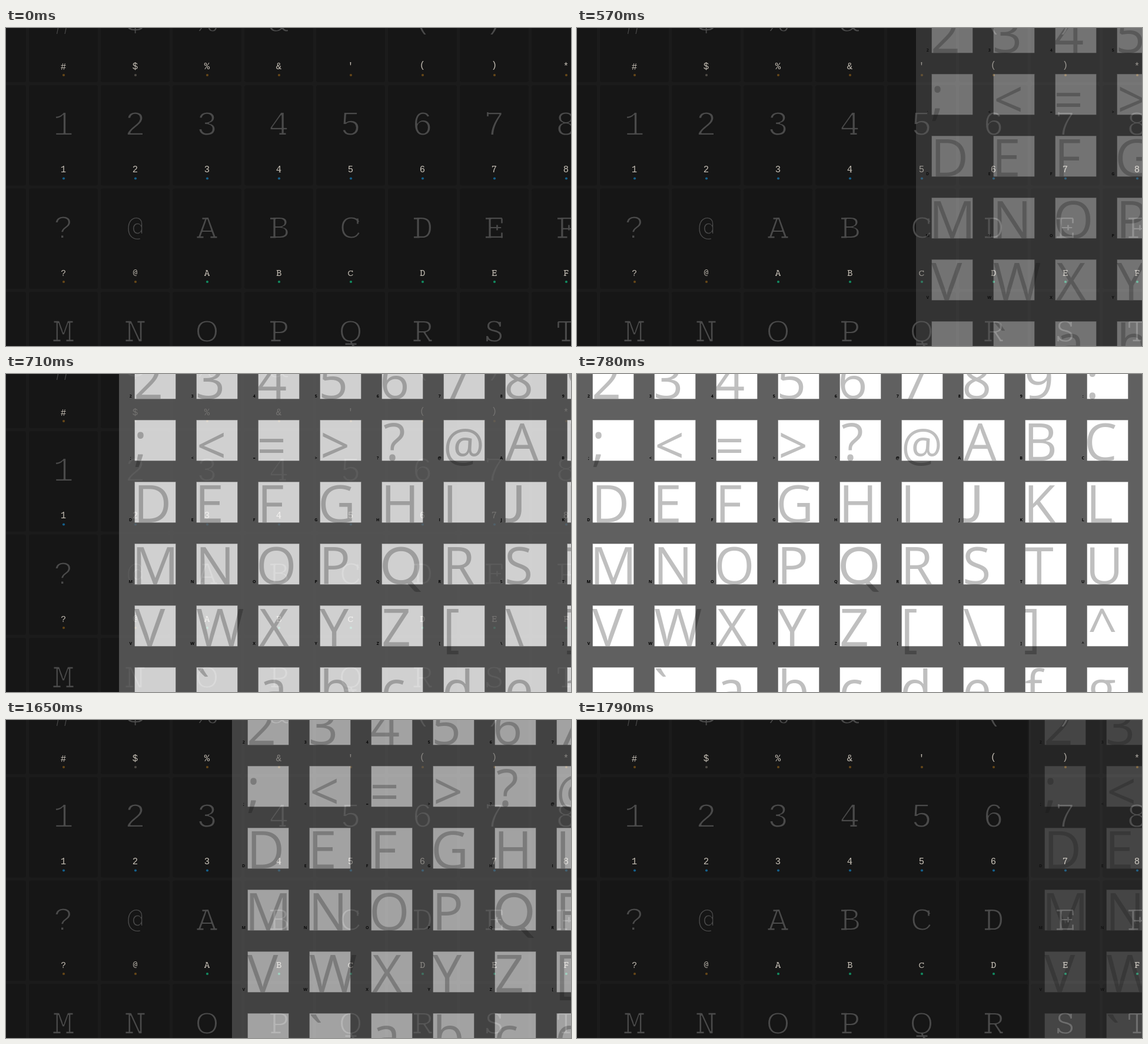
These frames come from a looping animation (960 px wide and 540 px high, 1860 ms). An HTML page with a canvas:

```html
<!DOCTYPE html>
<html lang="en">
<head>
<meta charset="utf-8">
<title>Character maps</title>
<style>
  html, body { margin: 0; width: 100%; height: 100%; overflow: hidden; background: #1b1b1b; }
  canvas { display: block; }
</style>
</head>
<body>
<canvas id="stage" width="960" height="540"></canvas>
<script>
const W = 960, H = 540;
const MONO = '"Liberation Mono", monospace';
const SANS = '"Liberation Sans", sans-serif';
const OPEN = '"Open Sans", sans-serif';
const LATO = 'Lato, sans-serif';
const CELL = '#161616';

function makeLayer(paint) {
  const layer = document.createElement('canvas');
  layer.width = W;
  layer.height = H;
  paint(layer.getContext('2d'));
  return layer;
}

// Slab serifs relative to the centre of the baseline:
// top and bottom bars as [x1, x2], ticks as [x, y1, y2].
const leftSerif = [-14.5, -5];
const SLABS = {
  A: { top: [[-8, 1]], bottom: [[-17, -6], [6, 17]] },
  B: { top: [leftSerif], bottom: [leftSerif] },
  C: { ticks: [[12, -33, -24]] },
  D: { top: [leftSerif], bottom: [leftSerif] },
  E: { top: [leftSerif], bottom: [leftSerif], ticks: [[13, -33, -25], [13, -9, 0], [5, -22, -13]] },
  F: { top: [leftSerif], bottom: [[-14, 2]], ticks: [[13, -33, -25], [5, -22, -13]] },
  M: { top: [[-16, -8], [8, 16]], bottom: [[-17, -5], [5, 17]] },
  N: { top: [[-16, -8], [4, 16]], bottom: [[-16, -4]] },
  P: { top: [leftSerif], bottom: [[-13, 3]] },
  Q: { bottom: [[-9, 10]], drop: 6 },
  R: { top: [leftSerif], bottom: [[-15, -3], [11, 16]] },
  S: { ticks: [[10, -33, -25], [-12, -9, 0]] },
  T: { bottom: [[-7, 7]], ticks: [[-13, -33, -23], [13, -33, -23]] },
  4: { bottom: [[1, 12]] },
  7: { ticks: [[-11, -38, -31]] }
};

function slabStyle(ch) {
  if (ch === '@') return { font: '46px "DejaVu Sans Mono", monospace', dx: 0, dy: -4 };
  if ('COQ'.includes(ch)) return { font: '51px ' + SANS, dx: 0, dy: 0.5 };
  if (/[A-Z]/.test(ch)) return { font: '54px ' + MONO, dx: 'BDEFPR'.includes(ch) ? 2 : 0, dy: 0.9 };
  if (ch === '?') return { font: '55px ' + MONO, dx: 0, dy: 0.9 };
  const dy = '()'.includes(ch) ? -6 : ch === '#' ? 5 : 0.9;
  return { font: '59px ' + MONO, dx: 0, dy };
}

// thin > 0 shaves the outline down to a lighter weight
function slabGlyph(g, ch, x, y, scale, color, thin) {
  const { font, dx, dy } = slabStyle(ch);
  const { top = [], bottom = [], ticks = [], drop = 0 } = SLABS[ch] || {};
  g.save();
  g.translate(x, y);
  g.scale(scale, scale);
  g.font = font;
  g.textAlign = 'center';
  g.lineJoin = 'round';
  g.fillStyle = color;
  g.fillText(ch, dx, dy);
  if (thin) {
    g.strokeStyle = CELL;
    g.lineWidth = thin;
    g.strokeText(ch, dx, dy);
  }
  const weight = thin ? 2.6 : 3.8;
  const bar = ([a, b], by) => g.fillRect(a, by - weight / 2, b - a, weight);
  top.forEach(s => bar(s, -33));
  bottom.forEach(s => bar(s, drop - 1.3));
  ticks.forEach(([tx, a, b]) => g.fillRect(tx - weight / 2, a, weight, b - a));
  g.restore();
}

function dotColor(ch) {
  if (/\d/.test(ch)) return '#155f8a';
  if (/[A-Z]/.test(ch)) return '#128a60';
  return ch === '$' ? '#4d4a44' : '#664718';
}

const dark = makeLayer(g => {
  g.fillStyle = '#1b1b1b';
  g.fillRect(0, 0, W, H);
  ["#$%&'()*", '12345678', '?@ABCDEF', 'MNOPQRST'].forEach((row, r) => {
    const y = r * 175.5;
    for (let c = -1; c < 8; c++) {
      g.fillStyle = CELL;
      g.beginPath();
      g.roundRect(39 + c * 122, y - 78.5, 117, 170.5, 4);
      g.fill();
    }
    [...row].forEach((ch, c) => {
      const x = 97.5 + c * 122;
      slabGlyph(g, ch, x, y + 5.5, 1, '#4a4a4a', 1.9);
      slabGlyph(g, ch, x, y + 69.5, 0.265, '#c4beb4', 0);
      g.fillStyle = dotColor(ch);
      g.beginPath();
      g.arc(x + 0.5, y + 80, 2.1, 0, Math.PI * 2);
      g.fill();
    });
  });
});

// Each row: its characters and the distance from cell edge to ink
const LIGHT_ROWS = [
  ['23456789:', [3, 3, 0, 3, 2, 3, 2, 3, 4]],
  [';<=>?@ABC', [1, 5, 3, 5, 4, 4, 1, 6, 1]],
  ['DEFGHIJKL', [7, 6, 7, 2, 7, 7, -1, 6, 7]],
  ['MNOPQRSTU', [4, 7, 2, 7, 2, 7, 3, 0, 6]],
  ['VWXYZ[\\]^', [0, 1, 2, 0, 3, 6, 0, 0, 5]],
  ['_`abcdefg', [0, 2, 5, 7, 3, 2, 3, 1, 3]]
];

function lightFont(ch) {
  if ('JQ'.includes(ch)) return '88px ' + LATO;
  return (ch === '@' ? '78px ' : '88px ') + OPEN;
}

const light = makeLayer(g => {
  g.fillStyle = '#606060';
  g.fillRect(0, 0, W, H);
  LIGHT_ROWS.forEach(([chars, insets], r) => {
    [...chars].forEach((ch, c) => {
      const x = 26 + c * 105, y = r * 105 - 27;
      g.fillStyle = '#fff';
      g.fillRect(x + 0.5, y, 70, 69.5);
      g.strokeStyle = 'rgba(0,0,0,.2)';
      g.lineWidth = 1;
      g.strokeRect(x + 0.5, y + 0.5, 70, 69);

      g.fillStyle = 'rgba(0,0,0,.25)';
      g.font = lightFont(ch);
      g.textAlign = 'left';
      const ink = g.measureText(ch).actualBoundingBoxLeft;
      const dy = '<=>'.includes(ch) ? 6 : ch === '@' ? 2 : 0;
      g.fillText(ch, x + insets[c] + ink, y + 69 + dy);

      g.fillStyle = '#000';
      g.font = 'bold 7px ' + OPEN;
      g.textAlign = 'center';
      g.fillText(ch, x - 6.3, y + 67);
    });
  });
});

const LOOP = 1860, ENTER = 500, LEAVE = 1580, STEP = 70, STEPS = 5;

function slideStep(t) {
  if (t < ENTER) return 0;
  if (t < LEAVE) return Math.min(STEPS, 1 + Math.floor((t - ENTER) / STEP));
  return STEPS - 1 - Math.floor((t - LEAVE) / STEP);
}

const ctx = document.getElementById('stage').getContext('2d');
let start;

function draw(now) {
  if (start === undefined) start = now;
  const k = slideStep(Math.max(0, now - start) % LOOP);
  ctx.globalAlpha = 1;
  ctx.drawImage(dark, 0, 0);
  if (k > 0) {
    ctx.globalAlpha = k / STEPS;
    ctx.drawImage(light, W * (1 - k / STEPS), 0);
  }
  requestAnimationFrame(draw);
}
requestAnimationFrame(draw);
</script>
</body>
</html>
```
